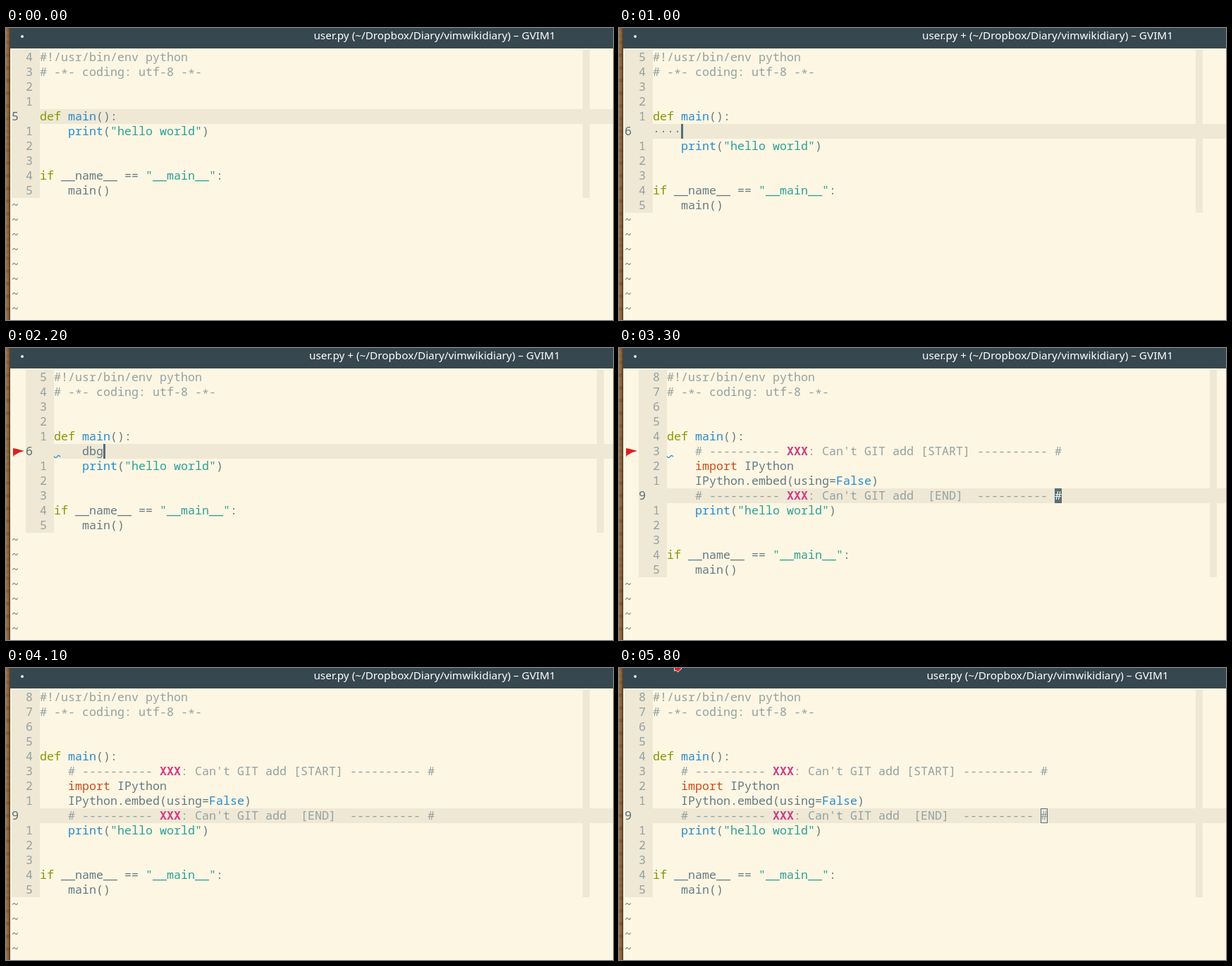
Recreate the animation shown at these times as an HTML page with a canvas. Size 861 by 414 pixels, loop 5.9 s.

```html
<!DOCTYPE html>
<html lang="en">
<head>
<meta charset="utf-8">
<title>Editor</title>
<style>
html, body { margin: 0; width: 100%; height: 100%; overflow: hidden; background: #fdf6e3; }
canvas { display: block; }
</style>
</head>
<body>
<canvas id="stage" width="861" height="414"></canvas>
<script>
const ctx = document.getElementById('stage').getContext('2d');
const W = 861, H = 414, LOOP = 5900;
const CELL = 10, ROW = 21, LEFT = 8, TOP = 31, ROWS = 18;
const MONO = '"Noto Sans Mono", "DejaVu Sans Mono", monospace';
const SANS = '"Noto Sans", "Open Sans", sans-serif';
const C = {
  paper: '#fdf6e3', shade: '#eee8d5', bar: '#37474f', cursor: '#586e75',
  text: '#657b83', note: '#93a1a1', key: '#859900', fn: '#268bd2',
  str: '#2aa198', imp: '#cb4b16', tag: '#d33682'
};

// A line is a list of [text, colour] pieces.
const head = [
  [['#!/usr/bin/env python', 'note']],
  [['# -*- coding: utf-8 -*-', 'note']],
  [], [],
  [['def', 'key'], [' '], ['main', 'fn'], ['():']]
];
const tail = [
  [['    '], ['print', 'fn'], ['('], ['"hello world"', 'str'], [')']],
  [], [],
  [['if', 'key'], [' __name__ == '], ['"__main__"', 'str'], [':']],
  [['    main()']]
];
const fence = label => [
  ['    # ---------- ', 'note'], ['XXX', 'tag'],
  [": Can't GIT add " + label + ' ---------- #', 'note']
];
const snippet = [
  fence('[START]'),
  [['    '], ['import', 'imp'], [' IPython']],
  [['    IPython.embed(using='], ['False', 'fn'], [')']],
  fence(' [END] ')
];

function rect(x, y, w, h, color) {
  ctx.fillStyle = color;
  ctx.fillRect(x, y, w, h);
}

function poly(points, fill, stroke) {
  ctx.beginPath();
  points.forEach(([x, y]) => ctx.lineTo(x, y));
  ctx.closePath();
  ctx.fillStyle = fill;
  ctx.fill();
  if (stroke) {
    ctx.strokeStyle = stroke;
    ctx.lineWidth = 1;
    ctx.stroke();
  }
}

function write(text, x, row, color, weight = 500) {
  ctx.font = `${weight} 16.667px ${MONO}`;
  ctx.textAlign = 'left';
  ctx.fillStyle = color;
  const y = TOP + row * ROW + 16;
  [...text].forEach((ch, i) => {
    if (ch !== ' ') ctx.fillText(ch, x + i * CELL, y + (ch === '*' ? 3 : 0));
  });
}

function writeLine(line, x, row) {
  for (const [text, kind = 'text'] of line) {
    write(text, x, row, C[kind], kind === 'tag' ? 700 : 500);
    x += text.length * CELL;
  }
}

function drawFrame(title) {
  rect(0, 0, W, H, C.paper);
  const wood = ctx.createLinearGradient(0, 0, 6, 0);
  wood.addColorStop(0, '#a07a50');
  wood.addColorStop(0.6, '#866039');
  wood.addColorStop(1, '#513720');
  rect(0, 0, 6, H, wood);
  for (let y = 0; y < H; y += 9) {
    rect(0, y, 6, 5, `rgba(60,36,16,${0.1 + 0.1 * Math.sin(y * 0.37)})`);
  }
  rect(6, 0, W - 6, 29, C.bar);
  ctx.fillStyle = '#e8ecee';
  ctx.beginPath();
  ctx.arc(23, 12, 2, 0, 7);
  ctx.fill();
  ctx.font = `500 15.3px ${SANS}`;
  ctx.textAlign = 'center';
  ctx.fillStyle = '#fff';
  ctx.fillText(title, 608, 16);
}

function drawSign(row, curl) {
  const y = TOP + row * ROW;
  rect(10, y + 8, 1, 17 - 8 + 1, '#7d7468');
  poly([[10, y + 7], [15, y + 8], [26, y + 14 - 3], [19, y + 13], [10, y + 18]].map(([x, v]) => [x, v - 4 + 3]), '#dc1f1f');
  if (!curl) return;
  ctx.strokeStyle = C.fn;
  ctx.lineWidth = 1.2;
  ctx.beginPath();
  for (let x = 0; x <= 9; x++) {
    ctx.lineTo(68 + x, y + 18 + 1.6 * Math.sin(x * 0.75 - 0.7 + 0.4));
  }
  ctx.stroke();
}

function drawCursor(kind, x, row, ch) {
  const y = TOP + row * ROW;
  if (kind === 'bar') rect(x, y, 3, ROW, C.cursor);
  if (kind === 'block') {
    rect(x, y, CELL, ROW, C.cursor);
    write(ch, x, row, C.paper);
  }
  if (kind === 'hollow') {
    ctx.strokeStyle = C.cursor;
    ctx.lineWidth = 1;
    ctx.strokeRect(x + 0.5, y + 0.5, CELL - 1, ROW - 1);
  }
}

function drawPointer(x) {
  poly([[x + 0.5, -1], [x + 0.5, 4], [x + 3, 3.5], [x + 6, 5.8], [x + 7.5, 3.5], [x + 10.5, 1.5], [x + 10.5, -1]],
    '#d0281c', '#f3dcd4');
}

function stateAt(t) {
  const s = { lines: [...head, ...tail], row: 4, col: 6, ch: 'i', dirty: t >= 1000 && t < 4100 };
  if (t < 900) {
    s.cursor = t >= 200 && t < 500 ? 'block' : '';
  } else if (t < 3300) {
    const typed = 'dbg'.slice(0, t < 1800 ? 0 : t < 2000 ? 1 : t < 2100 ? 2 : 3);
    s.lines = [...head, [[typed ? '    ' + typed : '····']], ...tail];
    s.row = 5;
    s.col = 4 + typed.length;
    s.cursor = 'bar';
    s.sign = t >= 1900;
    s.curl = t >= 2200;
  } else {
    s.lines = [...head, ...snippet, ...tail];
    s.row = 8;
    s.col = 55;
    s.ch = '#';
    s.sign = s.curl = t < 3800;
    const on = t < 3600 || (t >= 4000 && t < 4100) || (t >= 4400 && t < 5300) || t >= 5500;
    s.cursor = t >= 5700 ? 'hollow' : on ? 'block' : '';
    if (t >= 5100 && t < 5300) s.pointer = 5;
    if (t >= 5800) s.pointer = 78;
  }
  return s;
}

function draw(t) {
  const s = stateAt(t);
  const gutter = LEFT + (s.sign ? 20 : 0), x0 = gutter + 40;
  const height = s.lines.length * ROW;
  drawFrame(`user.py ${s.dirty ? '+ ' : ''}(~/Dropbox/Diary/vimwikidiary) – GVIM1`);
  rect(gutter, TOP, 40, height, C.shade);
  rect(x0 + 770, TOP, CELL, height, C.shade);
  rect(gutter, TOP + s.row * ROW, W - gutter, ROW, C.shade);
  for (let i = 0; i < ROWS; i++) {
    if (i >= s.lines.length) {
      write('~', LEFT, i, C.text);
    } else {
      const here = i === s.row;
      const num = here ? i + 1 : Math.abs(i - s.row);
      write(String(num), gutter + (here ? 0 : 20), i, here ? C.cursor : C.note);
      writeLine(s.lines[i], x0, i);
    }
  }
  if (s.sign) drawSign(5, s.curl);
  drawCursor(s.cursor, x0 + s.col * CELL, s.row, s.ch);
  if (s.pointer !== undefined) drawPointer(s.pointer);
}

const start = performance.now();
function tick() {
  draw((performance.now() - start) % LOOP);
  requestAnimationFrame(tick);
}
tick();
</script>
</body>
</html>
```
